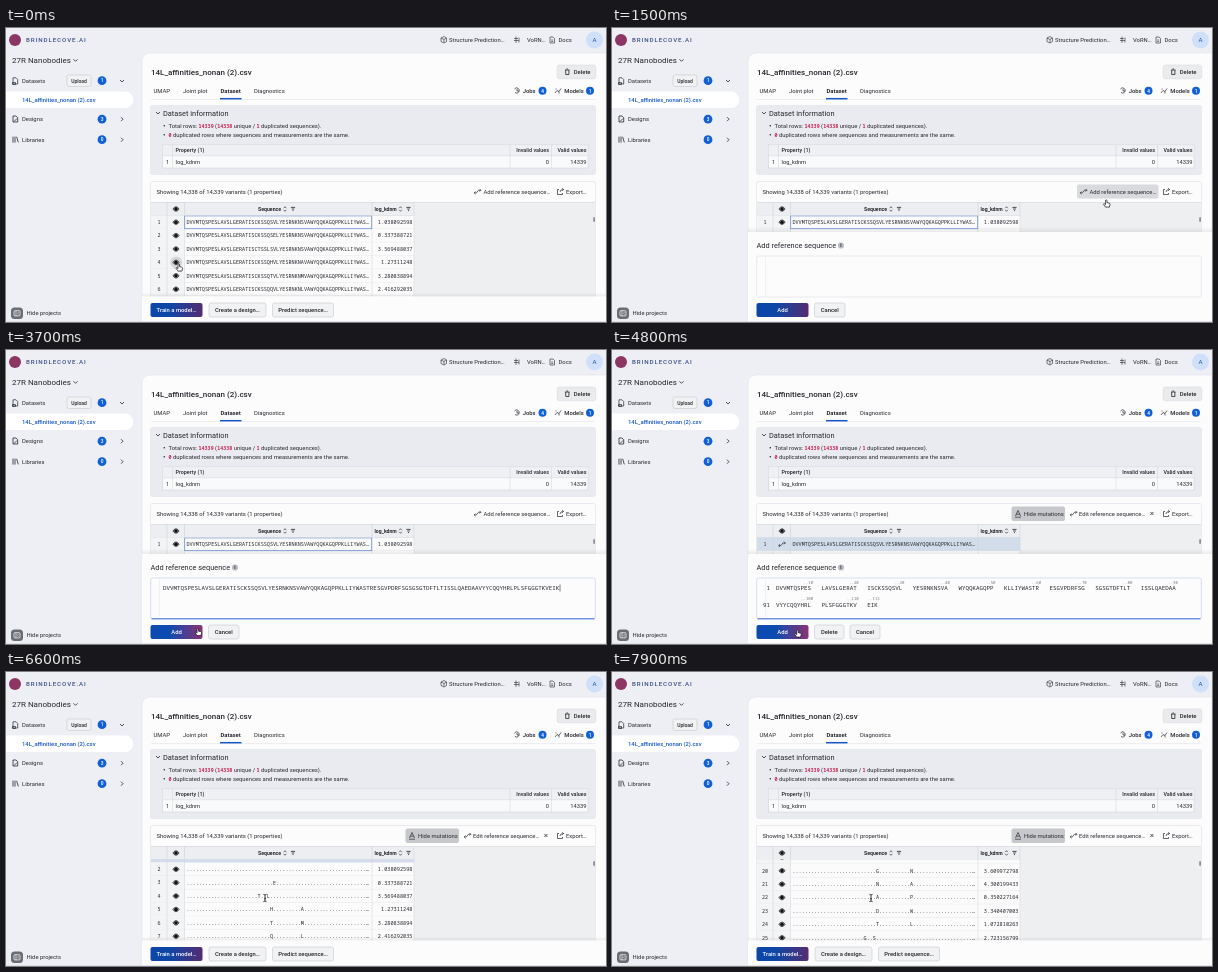
Recreate the animation shown at these times as an HTML page. Size 600x294 px, loop 8000 ms.

```html
<!DOCTYPE html>
<html lang="en">
<head>
<meta charset="utf-8">
<title>Reference sequence demo</title>
<style>
  html, body { margin: 0; width: 100%; height: 100%; overflow: hidden; background: #edeff4; }
  svg { display: block; width: 100%; height: 100%; }
  text { font-family: Roboto, Arial, sans-serif; white-space: pre; }
  .mono { font-family: "Noto Sans Mono", "DejaVu Sans Mono", monospace; }
  .count { font: 700 5.05px "Noto Sans Mono", "DejaVu Sans Mono", monospace; fill: #cb1f4f; }
</style>
</head>
<body>
<svg viewBox="0 0 600 294" xmlns="http://www.w3.org/2000/svg">
  <defs>
    <linearGradient id="primary"><stop offset=".35" stop-color="#0c47a8"/><stop offset="1" stop-color="#552c70"/></linearGradient>
    <linearGradient id="primaryHover"><stop offset=".35" stop-color="#0c4cb0"/><stop offset="1" stop-color="#8b3274"/></linearGradient>
    <linearGradient id="shade" x2="0" y2="1"><stop stop-color="#000" stop-opacity="0"/><stop offset="1" stop-color="#000" stop-opacity=".07"/></linearGradient>
    <clipPath id="body"><path d="M145 187.5H589V270H145z"/></clipPath>
  </defs>
  <g id="page"></g>
  <g id="live"></g>
</svg>
<script>
const LOOP = 8000, TICK = 100, ROW = 13.4;
const INK = '#25272c', BLUE = '#1557c8', LINE = '#dcdfe5', PANEL = '#fcfcfd';
const SEQ = 'DVVMTQSPESLAVSLGERATISCKSSQSVLYESRNKNSVAWYQQKAGQPPKLLIYWASTRESGVPDRFSGSGSG' +
  'TDFTLTISSLQAEDAAVYYCQQYHRLPLSFGGGTKVEIK';
const SHOWN = 58;

// value, then substitutions as position + residue
const VARIANTS = `1.038092598
0.337388721 28E
3.569488037 23T 26L
1.27311248 27H 37A
3.280838894 27T 37M
2.416292035 27Q 37L
-0.167705793 27G 37N
3.623858263 27K 37V
1.786874974 27T 37C
1.249932629 27L 38G 39W
1.742580215 27C 38S 55Q
0.265424195 27G 38L 55M
-0.416305831 27E 38K
2.084417326 27R 38T
1.530962871 27P 38D
3.117604925 27V 38G
0.924183067 27H 38E
2.660351748 27D 38R
3.609972798 27G 38N
4.300199433 27N 38A
0.350227164 27A 38P
3.340407003 27D 38W
1.072810263 27T 38L
2.723156799 23G 26S
1.948260317 23R 26V
0.713059482 23N 26A`.split('\n').map(line => line.split(' '));

// Drawing helpers; text is centred vertically on y
const text = (x, y, str, size = 5.85, { fill = INK, weight = 400, anchor = 'start', cls = '', spacing = 0 } = {}) =>
  `<text x="${x}" y="${y + size * .36}" font-size="${size}" fill="${fill}" font-weight="${weight}" text-anchor="${anchor}" class="${cls}" letter-spacing="${spacing}">${str}</text>`;
const mono = (x, y, str, size = 5.17, opts = {}) => text(x, y, str, size, { weight: 500, ...opts, cls: 'mono' });
const rect = (x, y, w, h, fill, { r = 0, stroke = 'none', sw = .6 } = {}) =>
  `<rect x="${x}" y="${y}" width="${w}" height="${h}" rx="${r}" fill="${fill}" stroke="${stroke}" stroke-width="${sw}"/>`;
const path = (d, stroke = INK, sw = .8, fill = 'none') =>
  `<path d="${d}" fill="${fill}" stroke="${stroke}" stroke-width="${sw}" stroke-linejoin="round"/>`;
const circle = (x, y, r, fill) => `<circle cx="${x}" cy="${y}" r="${r}" fill="${fill}"/>`;
const count = n => `<tspan class="count">${n}</tspan>`;

const badge = (x, y, n, r = 4.4) => circle(x, y, r, '#1260d6') +
  text(x, y, n, 4.8, { fill: '#fff', anchor: 'middle', weight: 500 });
const chevron = (x, y) => path(`M${x - 2} ${y - 1}l2 2 2-2`);
const chevronRight = (x, y) => path(`M${x - 1} ${y - 2}l2 2-2 2`);
const button = (x, y, w, h, label, size = 5.85) => rect(x, y, w, h, '#f1f2f4', { r: 2, stroke: '#c6c8cd' }) +
  text(x + w / 2, y + h / 2, label, size, { anchor: 'middle', weight: 500 });
const primary = (label, hover) => rect(144.5, 275, 52, 14, hover ? 'url(#primaryHover)' : 'url(#primary)', { r: 2 }) +
  text(170.5, 282, label, 5.85, { fill: '#fff', weight: 500, anchor: 'middle' });
const eye = (x, y) => path(`M${x - 3.1} ${y}q3.1-4.6 6.2 0q-3.1 4.6-6.2 0z`, '#222', .7, '#999') + circle(x, y, 1.7, '#111');
const swap = (x, y) => path(`M${x - 3.3} ${y + 1.4}h2.2l2-2.6h2.4m-1.2-1.3l1.3 1.3-1.3 1.3M${x - 2} ${y + .1}l-1.3 1.3 1.3 1.3`, INK, .7);
const sorter = (x, y) => path(`M${x - 1.3} ${y - .8}l1.3-1.5 1.3 1.5M${x - 1.3} ${y + .8}l1.3 1.5 1.3-1.5`, '#333', .7);
const filter = (x, y) => path(`M${x - 2.1} ${y - 1.6}h4.2M${x - 1.3} ${y}h2.6M${x - .5} ${y + 1.6}h1`, '#222', .8);

function drawPage() {
  const top = circle(9, 12, 6, '#8d3563') +
    text(20, 12, 'BRINDLECOVE.AI', 6.2, { fill: '#3a4f86', weight: 500, spacing: .9 }) +
    path('M435 10l3-1.5 2.5 1.5v3.5l-2.5 1.5-3-1.5zM435 10l3 1.5 2.5-1.5M438 11.5v3', INK, .6) +
    text(443, 12, 'Structure Prediction…', 5.85) +
    path('M508 10.5h4m-4 2h5m-3-4v6.5m3-5.5v5', INK, .6) + text(521, 12, 'VoRN…', 5.85) +
    path('M544 9h3l1.5 1.5v4.5h-4.5zM545.2 12h2M545.2 13.5h2', INK, .6) + text(552.5, 12, 'Docs', 5.85) +
    circle(588.5, 12, 8.5, '#cfe0fb') + text(588.5, 12, 'A', 6.2, { fill: '#174aa6', anchor: 'middle' });

  const side = text(6, 32, '27R Nanobodies', 8) + chevron(69.5, 32.3) +
    path('M7 49.8h3l1.7 1.7v4.5H7zM6.5 54.5h3v2h-3z', INK, .7) + text(16, 52.7, 'Datasets') +
    button(61, 47, 24, 11.5, 'Upload', 5) + badge(96, 52.7, 1) + chevron(116, 53) +
    path('M0 63.5H119a8.3 8.3 0 0 1 0 16.6H0z', 'none', 0, '#fff') +
    text(16, 71.8, '14L_affinities_nonan (2).csv', 5.85, { fill: BLUE, weight: 500 }) +
    path('M7 88h3l1.7 1.7v4.3H7zM8 93.5l3-3', INK, .8) + text(16, 91.2, 'Designs') + badge(96, 91.2, 3) + chevronRight(116, 91.2) +
    path('M7 108.6v6m2-6v6m1.6-5.8l1.7 5.6', INK, .8) + text(16, 111.7, 'Libraries') + badge(96, 111.7, 0) + chevronRight(116, 111.7) +
    rect(5, 279.5, 12, 11.5, '#6a6d73', { r: 3.5 }) + rect(8, 282.7, 6, 5.2, 'none', { r: .8, stroke: '#fff', sw: .7 }) +
    path('M10 282.7v5.2m2.7-3.7l-1.2 1.1 1.2 1.1', '#fff', .6) + text(20.5, 285, 'Hide projects');

  const heading = path('M136 294V33a8 8 0 0 1 8-8H600V294z', LINE, .5, PANEL) +
    text(145, 43.8, '14L_affinities_nonan (2).csv', 8, { weight: 500 }) +
    rect(551.2, 37, 38.5, 13.7, '#eaebed', { r: 2, stroke: '#d9dbdf' }) +
    path('M559 42h4.5m-3-1h1.5M559.7 42v4.5h3.2V42', INK, .8) + text(567.8, 43.8, 'Delete', 5.85, { weight: 500 }) +
    text(147.5, 62.8, 'UMAP') + text(177, 62.8, 'Joint plot') + text(214.5, 62.8, 'Dataset', 5.85, { weight: 700 }) + text(248, 62.8, 'Diagnostics') +
    path('M145 71.5H589', LINE, .5) + path('M214 70.7H235.5', BLUE, 1.5) +
    path('M508.5 61a2.6 2.6 0 1 1 .5 3.5M511 61v2h2', INK, .7) + text(516.7, 62.8, 'Jobs', 5.85, { weight: 500 }) + badge(536.5, 62.8, 4, 4) +
    path('M549 65l2-2.5 2 1 2-3m-5 0v1m3 2v2', INK, .7) + text(558.3, 62.8, 'Models', 5.85, { weight: 500 }) + badge(584, 62.8, 1, 4);

  const info = rect(144.5, 77.5, 445, 69, '#e9ebf0', { r: 2, stroke: '#e0e2e8' }) + chevron(152, 85) +
    text(157, 85, 'Dataset information', 7.4) +
    circle(158.3, 97.7, .8, INK) + circle(158.3, 106.7, .8, INK) +
    text(162.5, 97.7, `Total rows: ${count(14339)} (${count(14338)} unique / ${count(1)} duplicated sequences).`) +
    text(162.5, 106.7, `${count(0)} duplicated rows where sequences and measurements are the same.`) +
    rect(156.5, 117, 425.5, 23, '#f9fafb', { stroke: '#cfd2d9' }) + rect(156.8, 117.3, 425, 10.2, '#eef0f4') +
    path('M156.5 127.7H582M166.5 117V140M504 117V140M545.5 117V140', '#cfd2d9', .5) +
    text(169.5, 122.3, 'Property (1)', 5.4, { weight: 500 }) +
    text(543, 122.3, 'Invalid values', 5.4, { weight: 500, anchor: 'end' }) +
    text(580.5, 122.3, 'Valid values', 5.4, { weight: 500, anchor: 'end' }) +
    text(161.5, 134, '1', 5.4, { anchor: 'middle' }) + text(169.5, 134, 'log_kdnm', 5.7) +
    text(543, 134, '0', 5.8, { anchor: 'end' }) + text(580.5, 134, '14339', 5.8, { anchor: 'end' });

  const table = rect(144.5, 153.5, 445, 130, PANEL, { r: 2, stroke: LINE }) +
    text(150.5, 163.5, 'Showing 14,338 of 14,339 variants (1 properties)') +
    path('M551.5 161.5v5h5v-1.5m-5-3.5h1.5m1 2.5q0-2.5 3.5-2.5m-1.3-1.3l1.4 1.3-1.4 1.3', INK, .7) + text(560, 163.5, 'Export…') +
    rect(145, 174.5, 444, 110, '#eeeff1') + rect(145, 174.5, 263, 13, '#eceef1') +
    path('M145 174.5H589M145 187.5H408', '#c9ccd2', .5) +
    eye(170, 181) + text(252, 181, 'Sequence', 5.2, { weight: 700 }) + sorter(279, 181) + filter(287, 181) +
    text(368.5, 181, 'log_kdnm', 5.1, { weight: 700 }) + sorter(394.5, 181) + filter(402.5, 181) +
    path('M161 174.5V187.5M178.5 174.5V187.5M366 174.5V187.5M408 174.5V187.5', '#c9ccd2', .5) +
    rect(587.2, 189, 1.8, 5, '#8f9298', { r: .9 });
  return top + side + heading + info + table;
}

function mutate(muts, asDots) {
  const residues = asDots ? Array(SHOWN).fill('.') : [...SEQ.slice(0, SHOWN)];
  for (const m of muts) residues[parseInt(m)] = m.slice(-1);
  return residues.join('') + '…';
}

function drawRows(t, hasRef) {
  const scroll = scrollAt(t);
  let out = '';
  for (let n = 1; n <= VARIANTS.length; n++) {
    const y = 194.2 + (n - 1) * ROW - scroll;
    if (y < 178 || y > 277) continue;
    const isRef = hasRef && n === 1;
    const [value, ...muts] = VARIANTS[hasRef ? Math.max(n - 2, 0) : n - 1];
    out += rect(145, y - ROW / 2, 263, ROW, isRef ? '#d3dcea' : '#fbfbfc') +
      rect(145, y - ROW / 2, 33.5, ROW, isRef ? '#d3dcea' : '#f3f4f6') +
      path(`M145 ${y + ROW / 2}H408`, '#dadce0', .5) + mono(153, y, n, 5, { anchor: 'middle' });
    if (!hasRef && n === 4 && t < 500) out += circle(170.3, y, 6, '#d5d6da');
    out += isRef ? swap(170, y) : eye(170, y);
    out += mono(180.4, y, mutate(isRef ? [] : muts, hasRef && !isRef));
    if (!isRef) out += mono(406.5, y, value, 5.25, { anchor: 'end' });
  }
  out += path('M161 187V270M178.5 187V270M366 187V270M408 187V270', '#d0d3d9', .5);
  if (!hasRef) out += rect(178.7, 187.9, 187, 12.8, 'none', { stroke: '#6c8fd2', sw: .8 });
  return `<g clip-path="url(#body)">${out}</g>`;
}

function drawToolbar(t, hasRef) {
  if (!hasRef) {
    const hover = t >= 900 && t < 1700 ? rect(465, 156.5, 81.5, 14, '#d8dade', { r: 2 }) : '';
    return hover + swap(471.5, 163.5) + text(477.5, 163.5, 'Add reference sequence…');
  }
  return rect(399.5, 156.5, 53.5, 14.5, '#c6c8cc', { r: 2 }) +
    path('M403.5 166l2.5-5.5 2.5 5.5m-4-1.8h3m-4.5 3h6', INK, .7) + text(412, 163.5, 'Hide mutations') +
    swap(461.5, 163.5) + text(467, 163.5, 'Edit reference sequence…') +
    path('M538.4 162l3 3m0-3l-3 3', INK, .8);
}

function drawFormatted() {
  let out = '';
  for (let i = 0; i < SEQ.length; i += 10) {
    const x = 164 + (i % 90) / 10 * 45.6, y = i < 90 ? 238 : 254.7;
    const block = SEQ.slice(i, i + 10);
    out += mono(x, y, block, 5.85) +
      mono(x + block.length * 3.51 + 2, y - 5.8, '..' + (i + block.length), 4, { anchor: 'end', fill: '#777' });
  }
  return out + mono(158, 238, '1', 5.85, { anchor: 'end' }) + mono(158, 254.7, '91', 5.85, { anchor: 'end' });
}

function drawDialog(t, hasRef) {
  const drop = 91 * (1 - ramp(t, 1200, 1400) + ramp(t, 5000, 5200));
  if (drop >= 91) return '';
  const focused = t >= 2300;
  let out = rect(136, 199, 464, 5, 'url(#shade)') + rect(136, 204, 464, 90, PANEL) +
    text(144.5, 217.3, 'Add reference sequence', 7.4) +
    circle(229, 217.5, 3.1, '#b9bcc2') + text(229, 217.5, 'i', 4.8, { anchor: 'middle', weight: 700 }) +
    rect(144.7, 228, 444.6, 41, PANEL, { r: 2, stroke: focused ? '#bccbe9' : '#dcdee2' }) +
    path('M153.5 229.5V267', '#e4e6ea', .5);
  if (focused) out += path('M145.5 268.8H588.5', '#3c6fd8', 1);
  if (hasRef) out += drawFormatted();
  else if (t >= 2500) out += mono(157, 238, SEQ, 5.85) + path('M554 234.5v7', INK, .6);
  else if (focused) out += path('M157 234.5v7', INK, .6);
  out += primary('Add', t >= 3700);
  out += hasRef ? button(202.5, 275, 29.5, 14, 'Delete') + button(238, 275, 30, 14, 'Cancel') : button(202.5, 275, 30.5, 14, 'Cancel');
  return `<g transform="translate(0 ${drop})">${out}</g>`;
}

const drawFooter = t => rect(136, 264.5, 464, 4, 'url(#shade)') + rect(136, 268.5, 464, 26, PANEL) +
  primary('Train a model…', t >= 5000 && t < 5700) +
  button(203, 275, 57, 14, 'Create a design…') + button(266.5, 275, 61, 14, 'Predict sequence…');

const POINTER = {
  arrow: path('M0 0v7.2l1.7-1.6 1.2 2.6 1.2-.5-1.2-2.6h2.4z', '#fff', .5, '#111'),
  hand: path('M-.8 .3q.8-.8 1.5 0v2.4l2.1.4q1.1.3.9 1.5l-.6 2.5h-3.9l-2-2.8q.2-.9 1-.5l1 .9z', '#111', .7, '#fff'),
  text: path('M-1.6-3.6q1.6 0 1.6 1 0-1 1.6-1M0-2.6v5.2M-1.6 3.6q1.6 0 1.6-1 0 1 1.6 1M-.9.8h1.8', '#111', .8)
};
const STOPS = [[0, 172.8, 236], [400, 172.8, 236], [1000, 494.3, 172], [1600, 494.3, 172], [2200, 333, 245],
  [3000, 333, 245], [3800, 185.5, 280], [5200, 185.5, 280], [5600, 192, 269.5], [6200, 259, 226], [LOOP, 259, 226]];
const SHAPES = [[0, 'hand'], [500, 'arrow'], [900, 'hand'], [1700, 'arrow'], [2100, 'text'], [3100, 'arrow'],
  [3700, 'hand'], [5500, 'arrow'], [6000, 'text']];

const clamp = v => Math.min(1, Math.max(0, v));
function ramp(t, from, to) {
  const p = clamp((t - from) / (to - from));
  return p * p * (3 - 2 * p);
}

// Accelerates, then runs at a steady speed
function scrollAt(t) {
  const dt = Math.max(0, t - 6400), speed = .19, lead = 368;
  return dt < lead ? speed * dt * dt / (2 * lead) : speed * (dt - lead / 2);
}

function drawPointer(t) {
  const i = STOPS.findIndex(([end]) => end > t);
  const [t0, x0, y0] = STOPS[i - 1], [t1, x1, y1] = STOPS[i];
  const p = ramp(t, t0, t1);
  const shape = SHAPES.filter(([from]) => from <= t).pop()[1];
  return `<g transform="translate(${x0 + (x1 - x0) * p} ${y0 + (y1 - y0) * p})">${POINTER[shape]}</g>`;
}

const live = document.getElementById('live');
document.getElementById('page').innerHTML = drawPage();
let shown = -1;
function render(now) {
  const t = Math.floor(now % LOOP / TICK) * TICK;
  if (t !== shown) {
    shown = t;
    const hasRef = t >= 4600;
    live.innerHTML = drawRows(t, hasRef) + drawToolbar(t, hasRef) + drawFooter(t) + drawDialog(t, hasRef) +
      path('M0 293.6H600', '#cfd2d8', .6) + drawPointer(t);
  }
  requestAnimationFrame(render);
}
render(0);
</script>
</body>
</html>
```
